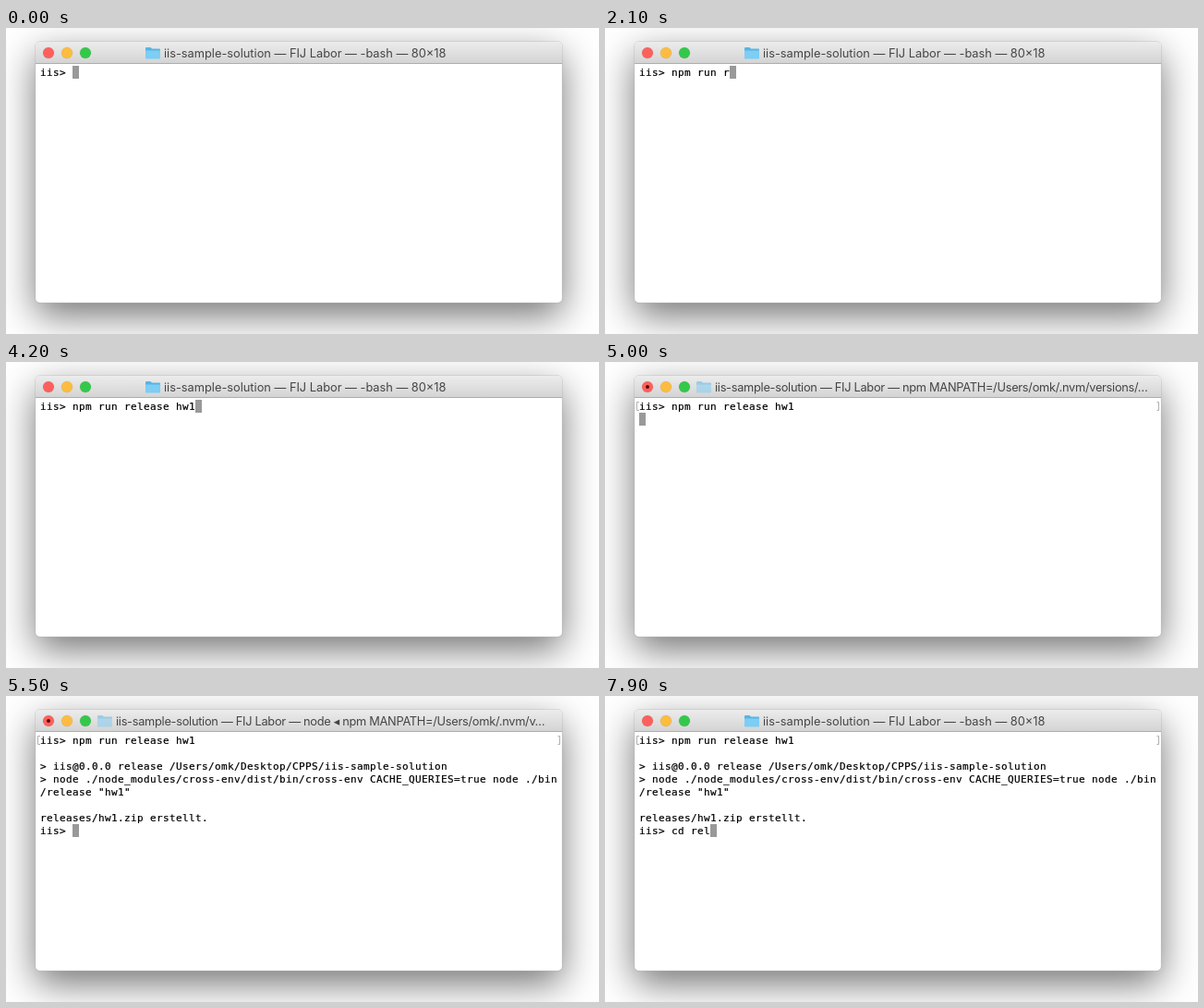
Recreate the animation shown at these times as an HTML page. Size 642 px wide and 332 px high, loop 8000 ms.

```html
<!DOCTYPE html>
<html lang="de">
<head>
<meta charset="utf-8">
<title>Terminal</title>
<style>
  html, body { margin: 0; width: 100%; height: 100%; overflow: hidden; background: #fff; }
  svg { display: block; width: 100%; height: 100%; }
  text { white-space: pre; }
  #shadow { fill: #fff; filter: drop-shadow(0 14px 20px rgba(0, 0, 0, .55)); }
  #title { font: 12.8px Inter, sans-serif; fill: #454545; }
  #screen { font: 11px "DejaVu Sans Mono", monospace; letter-spacing: .378px; stroke: #000; stroke-width: .2px; }
</style>
</head>
<body>
<svg viewBox="0 0 642 332">
  <defs>
    <linearGradient id="bar" x2="0" y2="1">
      <stop offset="0" stop-color="#ececec"/>
      <stop offset="1" stop-color="#d4d4d4"/>
    </linearGradient>
  </defs>

  <rect id="shadow" x="32" y="15" width="570" height="283" rx="5"/>
  <rect x="31.75" y="14.75" width="570.5" height="283.5" rx="5" fill="#fff" stroke="#000" stroke-opacity=".28" stroke-width=".5"/>
  <path d="M32 38V20a5 5 0 0 1 5-5H597a5 5 0 0 1 5 5V38Z" fill="url(#bar)"/>
  <path d="M32 38.5H602" stroke="#adadad"/>

  <g stroke-opacity=".12" stroke="#000" stroke-width=".5">
    <circle cx="46" cy="27" r="6" fill="#fc605c"/>
    <circle cx="66" cy="27" r="6" fill="#fdbc40"/>
    <circle cx="86" cy="27" r="6" fill="#34c84a"/>
  </g>
  <circle id="unsaved" cx="46" cy="27" r="2" fill="#5a0805"/>

  <g id="folder">
    <path d="M0 22a1 1 0 0 1 1-1H5.5L7 22.5H15a1 1 0 0 1 1 1V33H0Z" fill="#58b4e2"/>
    <path d="M0 24.5H16V32.5a1 1 0 0 1-1 1H1a1 1 0 0 1-1-1Z" fill="#7dcdf5"/>
  </g>
  <text id="title" y="32"></text>

  <path id="marks" d="M37 43.5H34.5V52.5H37M597.5 43.5H599.5V52.5H597.5" fill="none" stroke="#b0b0b0"/>
  <rect id="cursor" width="7" height="14" fill="#999"/>
  <g id="screen"></g>
</svg>

<script>
const LOOP = 8000, LEFT = 37, TOP = 41, CELL_W = 7, CELL_H = 14;
const $ = id => document.getElementById(id);

const PROMPT = "iis> ";
const COMMAND = "npm run release hw1";
const NEXT_COMMAND = "cd rel";
// Moment at which each character of a command appears
const COMMAND_KEYS = [100, 600, 600, 800, 1500, 1600, 1800, 1900, 2100, 2300,
  2400, 2500, 2600, 2700, 2900, 3100, 3400, 3900, 4200];
const NEXT_KEYS = [6900, 7000, 7200, 7500, 7600, 7900];
const ENTER = 4700, RUNNING = 4800, BUSY = 5000, OUTPUT = 5200, CHILD = 5300, DONE = 5500, IDLE = 5600;

const OUTPUT_LINES = [
  "",
  "> iis@0.0.0 release /Users/omk/Desktop/CPPS/iis-sample-solution",
  "> node ./node_modules/cross-env/dist/bin/cross-env CACHE_QUERIES=true node ./bin",
  '/release "hw1"',
  ""
];
const TITLE = "iis-sample-solution — FIJ Labor — ";

const rows = Array.from({ length: 8 }, (_, i) => {
  const row = document.createElementNS("http://www.w3.org/2000/svg", "text");
  row.setAttribute("x", LEFT);
  row.setAttribute("y", TOP + i * CELL_H + 11);
  return $("screen").appendChild(row);
});

const typed = (text, keys, t) => text.slice(0, keys.filter(k => k <= t).length);

function screenLines(t) {
  const lines = [PROMPT + typed(COMMAND, COMMAND_KEYS, t)];
  if (t >= OUTPUT) lines.push(...OUTPUT_LINES);
  if (t >= DONE) lines.push("releases/hw1.zip erstellt.", PROMPT + typed(NEXT_COMMAND, NEXT_KEYS, t));
  else if (t >= ENTER) lines.push("");
  return lines;
}

function titleSuffix(t) {
  if (t < RUNNING || t >= IDLE) return "-bash — 80×18";
  return t < CHILD ? "npm MANPATH=/Users/omk/.nvm/versions/…"
                   : "node ◂ npm MANPATH=/Users/omk/.nvm/v…";
}

const setText = (node, text) => { if (node.textContent !== text) node.textContent = text; };
const show = (id, visible) => $(id).setAttribute("visibility", visible ? "visible" : "hidden");

function draw(t) {
  const lines = screenLines(t);
  rows.forEach((row, i) => setText(row, lines[i] || ""));
  const last = lines.length - 1;
  $("cursor").setAttribute("x", LEFT + lines[last].length * CELL_W);
  $("cursor").setAttribute("y", TOP + last * CELL_H);
  show("marks", t >= ENTER);

  const running = t >= RUNNING && t < IDLE;
  const busy = t >= BUSY && t < IDLE;
  const folderX = running ? 99 : 151;
  setText($("title"), TITLE + titleSuffix(t));
  $("title").setAttribute("x", folderX + 20);
  $("title").style.letterSpacing = running ? "-.28px" : "0";
  $("folder").setAttribute("transform", `translate(${folderX})`);
  $("folder").setAttribute("opacity", busy ? .5 : 1);
  show("unsaved", busy);
}

const start = performance.now();
function tick() {
  draw((performance.now() - start) % LOOP);
  requestAnimationFrame(tick);
}
tick();
</script>
</body>
</html>
```
